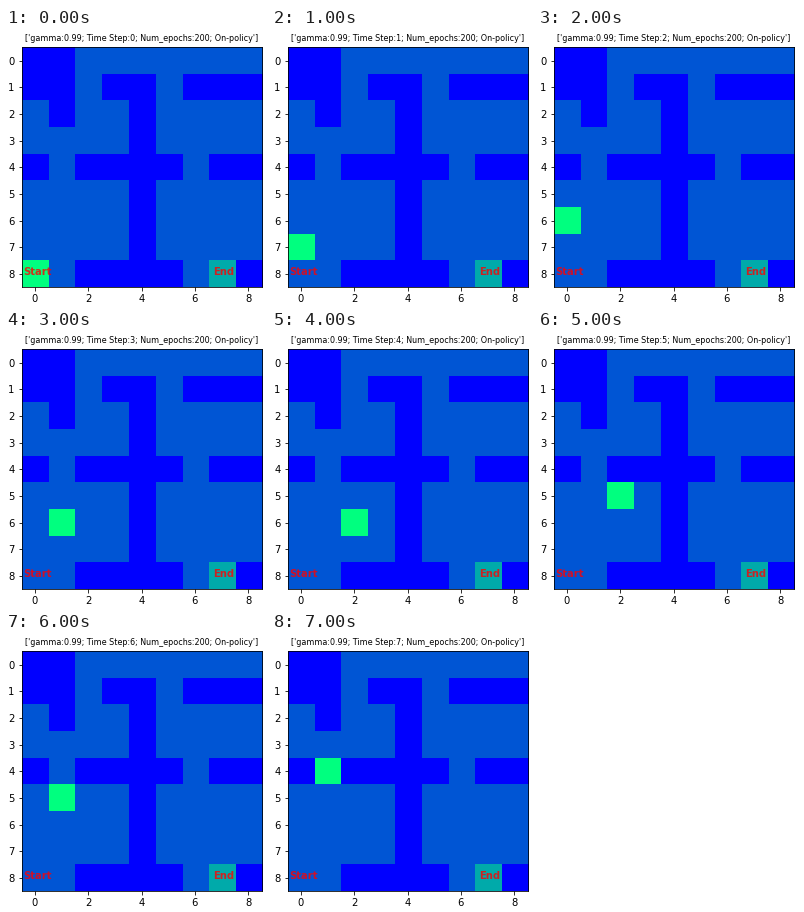
Write a matplotlib script that moves like this. It is 260 px wide and 274 px high and loops after 8000 ms.

```python
import numpy as np
import matplotlib.pyplot as plt
from matplotlib.animation import FuncAnimation

W, H, DPI = 260, 274, 72
LEFT, TOP, SIDE = 15.6, 19.4, 240
WALL, FLOOR, GOAL, AGENT = range(4)

MAZE = [
    "##.......",
    "##.##.###",
    ".#..#....",
    "....#....",
    "#.####.##",
    "....#....",
    "....#....",
    "....#....",
    "..####.G#",
]
CODES = {"#": WALL, ".": FLOOR, "G": GOAL}
# Agent cell (row, column) at each time step
PATH = [(8, 0), (7, 0), (6, 0), (6, 1), (6, 2), (5, 2), (5, 1), (4, 1)]

plt.rcParams.update({"font.family": "DejaVu Sans", "font.size": 10})

base = np.array([[CODES[c] for c in row] for row in MAZE])

fig = plt.figure(figsize=(W / DPI, H / DPI), dpi=DPI, facecolor="white")
ax = fig.add_axes([LEFT / W, 1 - (TOP + SIDE) / H, SIDE / W, SIDE / H])
image = ax.imshow(base, cmap="winter", vmin=WALL, vmax=AGENT,
                  interpolation="nearest")
ax.set_xticks(range(0, 9, 2))
ax.set_yticks(range(9))
title = ax.set_title("", fontsize=8)


def label(col, row, text):
    ax.text(col + 0.08, row - 0.08, text, color="red", alpha=0.8,
            weight="bold", ha="center", va="center")


label(0, 8, "Start")
label(7, 8, "End")


def update(step):
    grid = base.copy()
    grid[PATH[step]] = AGENT
    image.set_data(grid)
    title.set_text(f"['gamma:0.99; Time Step:{step}; "
                   "Num_epochs:200; On-policy']")
    return image, title


anim = FuncAnimation(fig, update, frames=len(PATH), interval=1000,
                     repeat=True, repeat_delay=0, blit=False)
plt.show()
```
